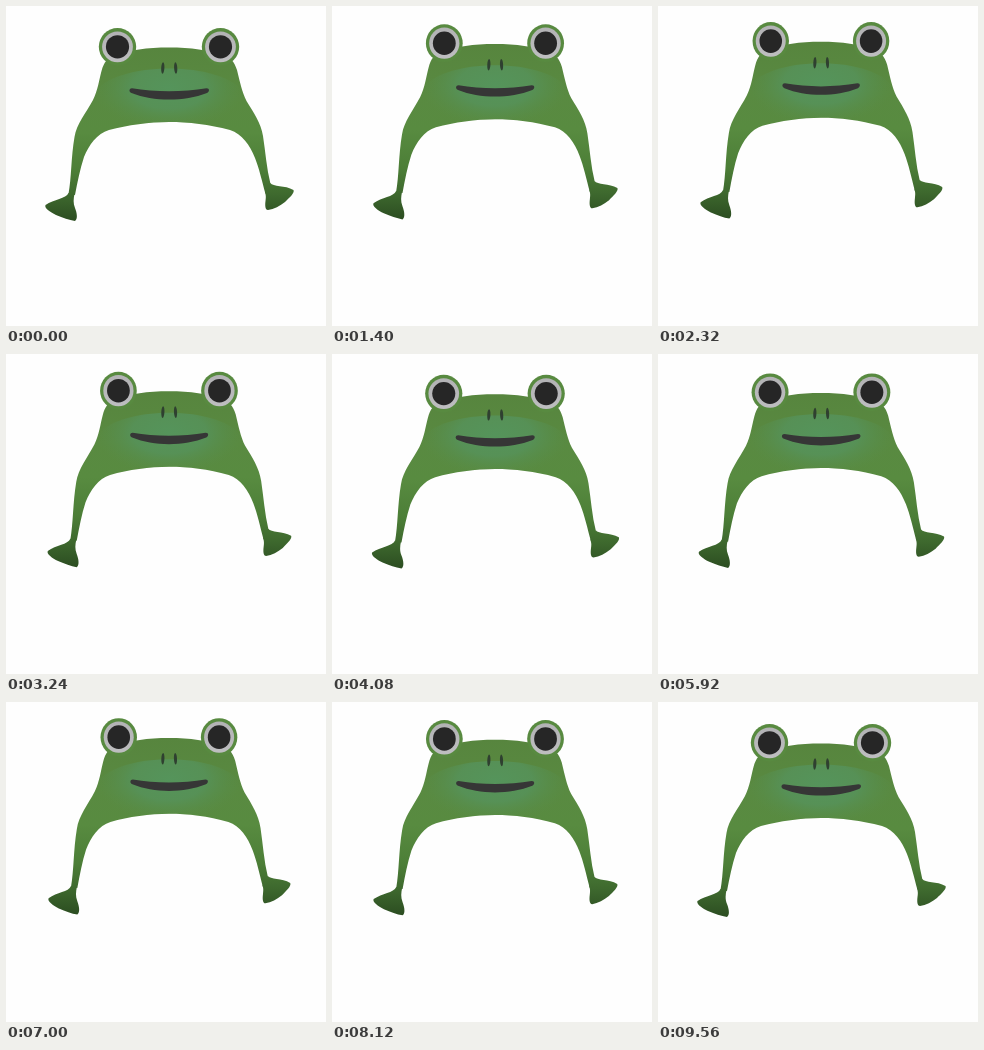
Write an HTML page that moves like this. It is 320 px wide and 320 px high and loops after 9.6 s.

```html
<!DOCTYPE html>
<html lang="en">
<head>
<meta charset="utf-8">
<title>Frog hat</title>
<style>
  html, body { margin: 0; width: 100%; height: 100%; overflow: hidden; background: #fefefe; }
  svg { display: block; width: 100vw; height: 100vh; }
</style>
</head>
<body>
<svg viewBox="0 0 320 320">
  <defs>
    <linearGradient id="skin" gradientUnits="userSpaceOnUse" x1="0" y1="40" x2="0" y2="213">
      <stop offset="0" stop-color="#57853e"/>
      <stop offset=".3" stop-color="#598a41"/>
      <stop offset=".5" stop-color="#588b40"/>
      <stop offset=".72" stop-color="#4c7e37"/>
      <stop offset=".86" stop-color="#3e692e"/>
      <stop offset="1" stop-color="#2d4f22"/>
    </linearGradient>
    <radialGradient id="snout" gradientUnits="userSpaceOnUse" cx="163" cy="82" r="76" gradientTransform="matrix(1 0 0 .55 0 36.9)">
      <stop offset="0" stop-color="#55945b"/>
      <stop offset=".5" stop-color="#56925a" stop-opacity=".85"/>
      <stop offset="1" stop-color="#588c48" stop-opacity="0"/>
    </radialGradient>
    <linearGradient id="white" x1="0" y1="0" x2="0" y2="1">
      <stop offset="0" stop-color="#b2b2b4"/>
      <stop offset="1" stop-color="#bebec0"/>
    </linearGradient>
    <path id="shape" d="M163 41.5 C185 41.5 203 44 216 49 C225 52 228 55 231 64
      C234 76 236 86 240.5 95 C248 107 255 117 257 130 C259.5 146 260.500 162 264.5 178
      L259.5 188 C256 175 253 162 249 152 C244 139 236 128 224 124
      C203 118.500 183 116 163 116 C143 116 122 119 103 124
      C91 127.500 83 139 78 151 C74 163 71.500 176 69 189
      L62.500 188 C65.500 172 65 151 68.500 131 C70.500 118 80 107 87 94
      C92 84 93 74 95.500 65 C98 56 101 52 110 49 C123 44 141 41.500 163 41.500Z"/>
    <g id="eye">
      <circle r="18.700" fill="#588a40"/>
      <circle r="15.400" fill="url(#white)"/>
      <circle r="11.600" fill="#262626"/>
    </g>
    <clipPath id="inside"><use href="#shape"/></clipPath>
  </defs>
  <g id="hat">
    <g fill="url(#skin)">
      <use href="#shape"/>
      <path d="M62.500 187 C60 193 48 193 39.500 199 C38 202 44 206 50 209 C57 212 63 214 69 215
        C72 213 71 207 69 202 C67 197 67.500 193 68.500 188Z"/>
      <path d="M264.300 177 C267 181 279 179 287.500 184 C289 187 283 192 279 196 C274 200 268 203 262 204
        C259 204 259 199 259.500 195 C260 191 260 190 259 186Z"/>
    </g>
    <path d="M88 88 C106 54 220 54 238 88 L246 130 H80Z" fill="url(#snout)" clip-path="url(#inside)"/>
    <use href="#eye" x="111.500" y="40.800"/>
    <use href="#eye" x="214.500" y="40.800"/>
    <g fill="#2f4030">
      <ellipse rx="1.600" ry="5.700" transform="translate(156.800 62) rotate(3)"/>
      <ellipse rx="1.600" ry="5.700" transform="translate(169.700 62) rotate(-3)"/>
    </g>
    <path d="M126 82.300 C149 86.300 177 86.300 200.500 82.300 C204 82.300 203.500 86 201 87
      C178 95.800 148 95.800 125.500 87 C122.500 86 123 82.300 126 82.300Z" fill="#363636"/>
  </g>
</svg>
<script>
  const hat = document.getElementById('hat');
  const PERIOD = 4800, CX = 160, BASE = 350;

  // The hat grows taller and narrower, then settles back.
  function draw(time) {
    const k = (1 - Math.cos(time / PERIOD * 2 * Math.PI)) / 2;
    const sx = 1 - 0.026 * k, sy = 1 + 0.0185 * k;
    hat.setAttribute('transform',
      `translate(${CX} ${BASE}) scale(${sx} ${sy}) translate(${-CX} ${-BASE})`);
  }

  const start = performance.now();
  function tick() {
    draw((performance.now() - start) % (2 * PERIOD));
    requestAnimationFrame(tick);
  }
  draw(0);
  requestAnimationFrame(tick);
</script>
</body>
</html>
```
